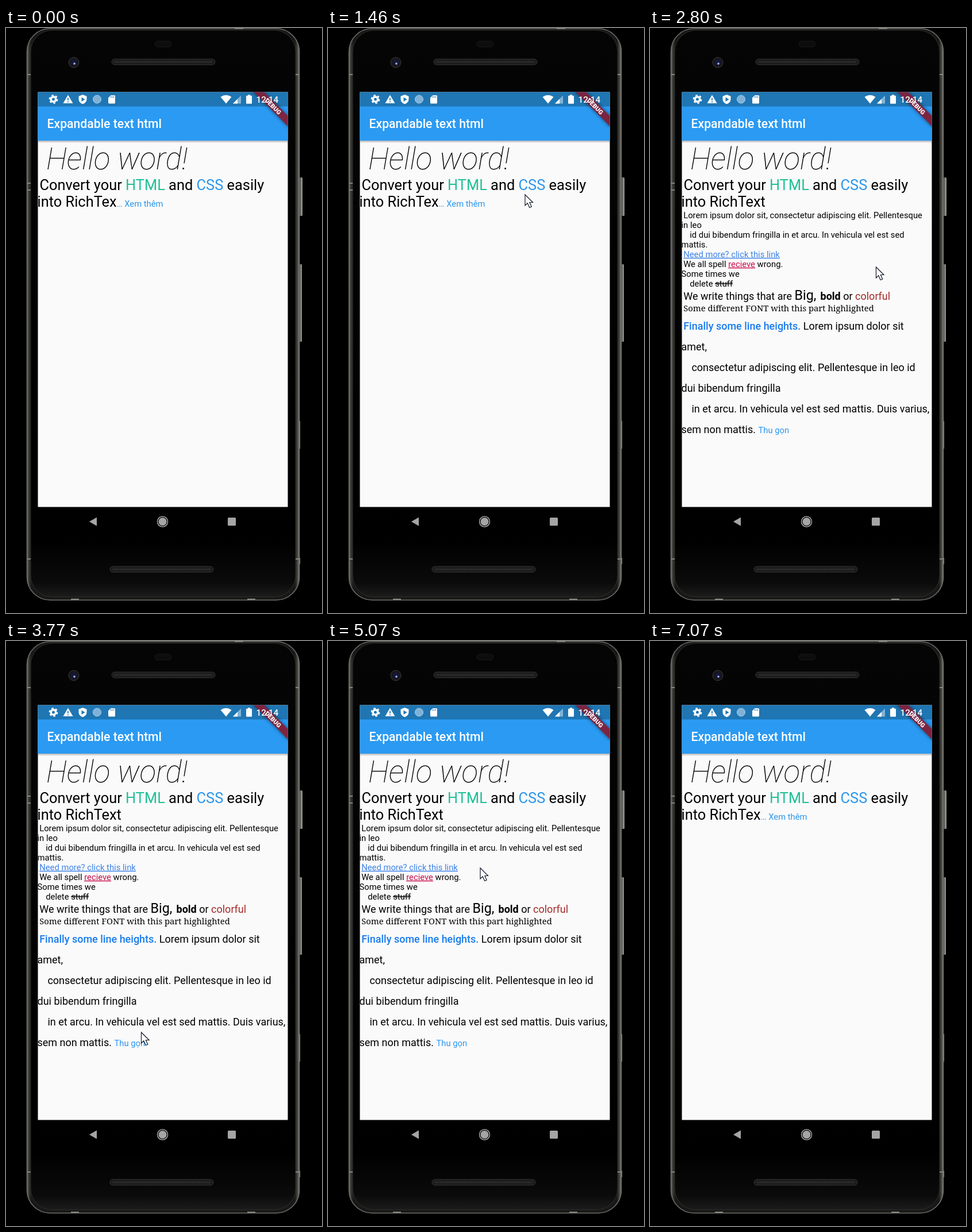
Animation, 550 px wide and 1018 px high, one loop 7100 ms. Source, as an HTML page:

```html
<!DOCTYPE html>
<html lang="en">
<head>
<meta charset="utf-8">
<title>Expandable text html</title>
<style>
  html, body { margin: 0; width: 100%; height: 100%; overflow: hidden; background: #000; }
  svg { display: block; width: 100%; height: 100%; }
  text { font-family: Roboto, sans-serif; white-space: pre; }
  .white { fill: #fff; }
  .h1 { font-size: 53px; font-weight: 100; font-style: italic; }
  .h2 { font-size: 25.4px; }
  .small { font-size: 14.8px; }
  .body { font-size: 18px; }
  .big { font-size: 23.3px; }
  .serif { font-family: "Noto Serif", serif; }
  .bold { font-weight: 700; }
  .medium { font-weight: 500; }
  .green { fill: #20bf97; }
  .blue { fill: #2b96ee; }
  .brown { fill: #a52a2a; }
  .link { fill: #3f83e8; text-decoration: underline; }
  .typo { fill: #c8104c; text-decoration: underline; }
  .struck { text-decoration: line-through; }
  .ribbon { fill: #7c2440; filter: drop-shadow(0 0 3px #0008); }
</style>
</head>
<body>
<svg viewBox="0 0 550 1018">
  <defs>
    <linearGradient id="rim">
      <stop offset="0" stop-color="#6c6d67"/>
      <stop offset=".007" stop-color="#3a3a36"/>
      <stop offset=".016" stop-color="#181818"/>
      <stop offset=".984" stop-color="#181818"/>
      <stop offset=".993" stop-color="#454540"/>
      <stop offset="1" stop-color="#80817a"/>
    </linearGradient>
    <linearGradient id="glass" x2="0" y2="1">
      <stop offset="0" stop-color="#050505"/>
      <stop offset=".9" stop-color="#000"/>
      <stop offset=".975" stop-color="#0b0b0b"/>
      <stop offset="1" stop-color="#1c1c1c"/>
    </linearGradient>
    <linearGradient id="key">
      <stop offset="0" stop-color="#2a2a28"/>
      <stop offset=".6" stop-color="#7d7e78"/>
      <stop offset="1" stop-color="#a5a6a0"/>
    </linearGradient>
    <linearGradient id="shade" x2="0" y2="1">
      <stop offset="0" stop-color="#000" stop-opacity=".3"/>
      <stop offset="1" stop-color="#000" stop-opacity="0"/>
    </linearGradient>
    <clipPath id="screen"><rect x="55.500" y="111.500" width="435" height="722"/></clipPath>
  </defs>

  <rect width="550" height="1018"/>

  <!-- phone body -->
  <g fill="url(#key)">
    <rect x="510" y="260" width="6" height="67" rx="1.500"/>
    <rect x="510" y="411" width="5" height="135" rx="1.500"/>
    <rect x="509" y="684" width="3" height="48"/>
    <rect x="509" y="922" width="3" height="11"/>
  </g>
  <rect x="36.500" y="1" width="474" height="994.500" rx="40" fill="url(#rim)" stroke="#6f706a" stroke-width="1.500"/>
  <rect x="43" y="4" width="461" height="986" rx="37" fill="url(#glass)" stroke="#2e2e2c"/>
  <path d="M37 81h6M37 270h6M37 282h6M504 81h6M504 924h6M37 924h6M398 1h15M113 994h14M420 994h14" stroke="#85867e" stroke-width="2"/>
  <g fill="#1b1b1b" stroke="#343434">
    <rect x="184" y="54" width="180" height="10" rx="5"/>
    <rect x="181" y="937" width="180" height="10" rx="5"/>
    <rect x="259" y="23" width="29" height="10" rx="5" fill="#0d0d0d" stroke="#191919"/>
  </g>
  <path d="M189 59H359M186 942H356" stroke="#393939" stroke-width="3" stroke-dasharray="1.500 1.500"/>
  <circle cx="118" cy="60" r="9" fill="#17171b" stroke="#3a3a3a"/>
  <circle cx="118" cy="60" r="5" fill="#15183a"/>
  <circle cx="119" cy="62" r="1.800" fill="#a9b5ee"/>

  <!-- navigation -->
  <g fill="#a5a5a5">
    <path d="M145 859l13-7.500v15z"/>
    <circle cx="272.500" cy="859" r="7"/>
    <circle cx="272.500" cy="859" r="9" fill="none" stroke="#a5a5a5" stroke-width="1.500"/>
    <rect x="386" y="852" width="14" height="14" rx="1.500"/>
  </g>

  <g clip-path="url(#screen)">
    <rect x="55" y="111" width="436" height="723" fill="#fafafa"/>
    <rect x="55" y="195.500" width="436" height="5" fill="url(#shade)"/>
    <rect x="55" y="111" width="436" height="26" fill="#1f76b3"/>
    <rect x="55" y="136.500" width="436" height="59.500" fill="#2b9af2"/>
    <text class="white medium" x="71.500" y="174.300" font-size="21.200">Expandable text html</text>

    <!-- debug ribbon -->
    <g transform="translate(490.500 111) rotate(45)">
      <rect class="ribbon" x="-45" y="29.600" width="90" height="12.700"/>
      <text class="white" y="39.800" font-size="10.800" font-weight="900" text-anchor="middle">DEBUG</text>
    </g>

    <!-- status icons -->
    <g class="white">
      <circle cx="82.500" cy="124" r="4.300" fill="none" stroke="#fff" stroke-width="3.600"/>
      <circle cx="82.500" cy="124" r="6.900" fill="none" stroke="#fff" stroke-width="2" stroke-dasharray="3.600 3.625"/>
      <path d="M108 116.500l8.500 14.500h-17z"/>
      <path d="M108 121.500v4.500M108 127.500v2" stroke="#1f76b3" stroke-width="1.700"/>
      <path d="M133.500 116l7 2.700v5q0 6-7 8.800-7-2.800-7-8.800v-5z"/>
      <path d="M131.500 120.500l6 3.700-6 3.700z" fill="#1f76b3"/>
      <circle cx="158.500" cy="124" r="7" fill="#7fb2d8" stroke="#a9cbe4"/>
      <path d="M182.500 117h6q1.500 0 1.500 1.500v11.500q0 1.500-1.500 1.500h-9q-1.500 0-1.500-1.500v-8.500z"/>
      <path d="M182.500 118.500v3M185 118.500v3M187.500 118.500v3" stroke="#1f76b3"/>
      <path d="M373.500 120q9.500-6.500 19 0l-9.500 11.500z"/>
      <path d="M395 131.500l14-14v14z" opacity=".45"/>
      <path d="M395 131.500l8-8v8z"/>
      <path d="M421 116.300h4v1.500h2q1 0 1 1v12q0 1-1 1h-8q-1 0-1-1v-12q0-1 1-1h2z"/>
      <text class="medium" x="435.500" y="130" font-size="15.200">12:14</text>
    </g>

    <text class="h1" x="69.900" y="245.900">Hello word!</text>
    <text class="h2" x="58.400" y="281.900">Convert your <tspan class="green">HTML</tspan> and <tspan class="blue">CSS</tspan> easily</text>

    <g id="collapsed">
      <text class="h2" x="54.500" y="311">into RichTex<tspan class="small blue">… Xem thêm</tspan></text>
    </g>

    <g id="expanded">
      <text class="h2" x="54.500" y="311">into RichText</text>
      <g class="small">
        <text x="58.200" y="331.100">Lorem ipsum dolor sit, consectetur adipiscing elit. Pellentesque</text>
        <text x="54.500" y="348">in leo</text>
        <text x="69.200" y="365">id dui bibendum fringilla in et arcu. In vehicula vel est sed</text>
        <text x="54.500" y="381.900">mattis.</text>
        <text class="link" x="58.200" y="398.800">Need more? click this link</text>
        <text x="58.200" y="415.800">We all spell <tspan class="typo">recieve</tspan> wrong.</text>
        <text x="54.500" y="432.700">Some times we</text>
        <text x="69.200" y="449.600">delete <tspan class="struck">stuff</tspan></text>
        <text class="serif" x="58.200" y="493">Some different FONT with this part highlighted</text>
      </g>
      <g class="body">
        <text x="58.200" y="473.300">We write things that are <tspan class="big">Big,</tspan><tspan class="bold" x="296.500">bold</tspan> or <tspan class="brown">colorful</tspan></text>
        <text x="58.200" y="524.500"><tspan class="medium" fill="#187bee">Finally some line heights.</tspan> Lorem ipsum dolor sit</text>
        <text x="54.500" y="560.500">amet,</text>
        <text x="72.400" y="596.500">consectetur adipiscing elit. Pellentesque in leo id</text>
        <text x="54.500" y="632.500">dui bibendum fringilla</text>
        <text x="72.400" y="668.500">in et arcu. In vehicula vel est sed mattis. Duis varius,</text>
        <text x="54.500" y="704.500">sem non mattis. <tspan class="small blue">Thu gọn</tspan></text>
      </g>
    </g>
  </g>

  <path id="cursor" d="M0 0V18.800L4.300 14.800L7.700 22.500L11.200 21L7.900 13.500H13.500Z" fill="#fff" stroke="#111827" stroke-width="1.200"/>
</svg>
<script>
  const LOOP = 7100;
  // time, x, y of the pointer tip
  const path = [
    [480, 556, 345], [1060, 343, 290], [1460, 343, 290], [1900, 238, 303],
    [2200, 238, 303], [2800, 393.5, 416], [3170, 393.5, 416], [3770, 235.5, 681],
    [4050, 228, 694], [4550, 242, 302], [4780, 242, 302], [5070, 265, 395],
    [5380, 222, 694], [5600, 222, 694], [6000, 556, 560]
  ];
  const openSpans = [[2050, 4050], [4720, 5560]];
  const [cursor, collapsed, expanded] =
    ['cursor', 'collapsed', 'expanded'].map(id => document.getElementById(id));

  const show = (node, visible) => node.setAttribute('visibility', visible ? 'visible' : 'hidden');
  const smooth = p => p * p * (3 - 2 * p);

  function draw() {
    const time = performance.now() % LOOP;
    const open = openSpans.some(([from, to]) => time >= from && time < to);
    show(expanded, open);
    show(collapsed, !open);

    const next = path.findIndex(point => point[0] > time);
    show(cursor, next > 0);
    if (next > 0) {
      const [t0, x0, y0] = path[next - 1];
      const [t1, x1, y1] = path[next];
      const p = smooth((time - t0) / (t1 - t0));
      cursor.setAttribute('transform', `translate(${x0 + (x1 - x0) * p} ${y0 + (y1 - y0) * p})`);
    }
    requestAnimationFrame(draw);
  }
  draw();
</script>
</body>
</html>
```
